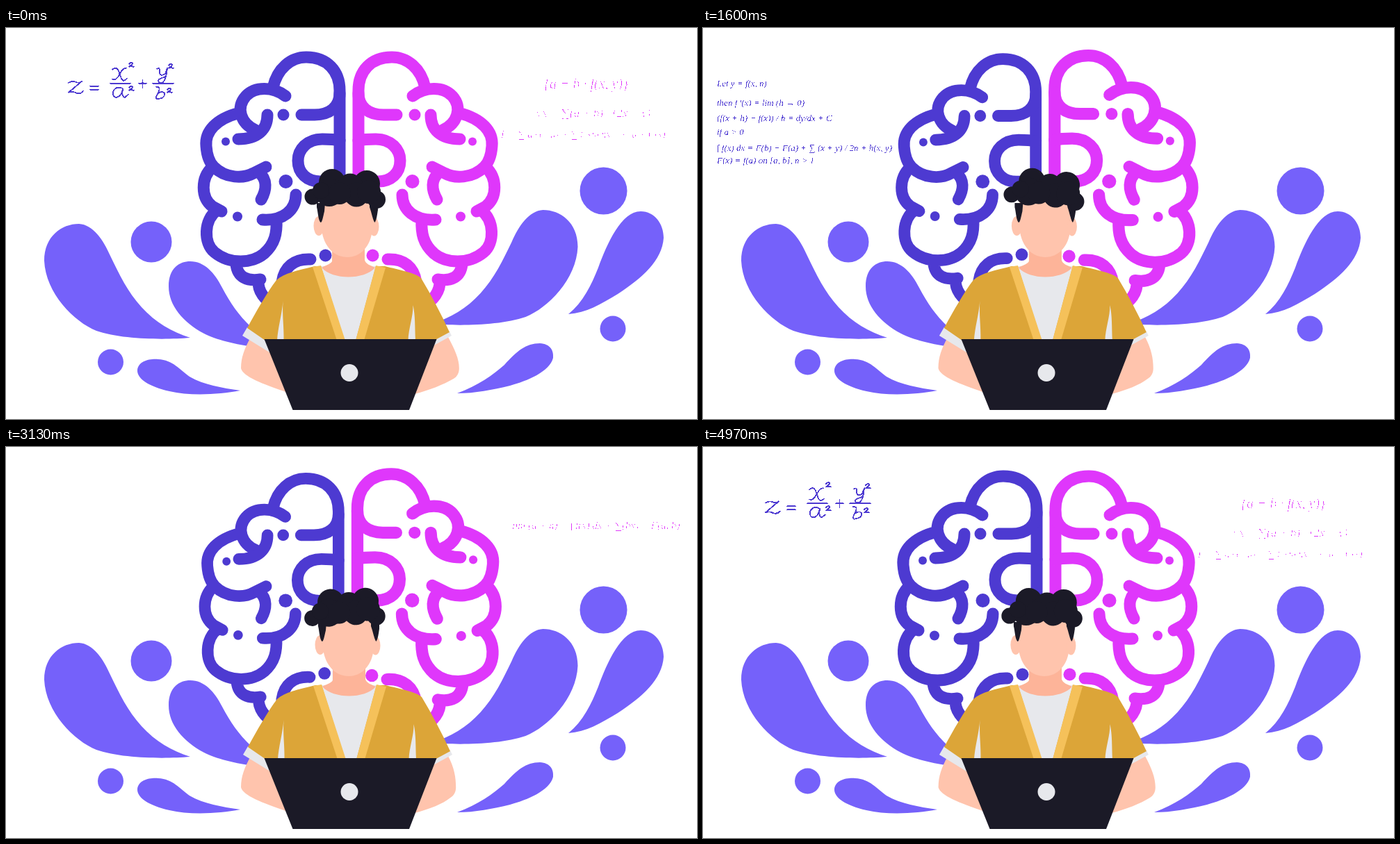
Recreate the animation shown at these times as an HTML page with a canvas. Size 994x563 px, loop 5010 ms.

```html
<!DOCTYPE html>
<html lang="en">
<head>
<meta charset="utf-8">
<title>Thinking</title>
<style>
html, body { margin: 0; width: 100%; height: 100%; overflow: hidden; background: #fff; }
canvas { display: block; }
</style>
</head>
<body>
<canvas id="stage" width="994" height="563"></canvas>
<script>
const LOOP = 5010;
const BLUE = '#4d3ad1', PINK = '#df37fb', SPLASH = '#7561fa';
const SKIN = '#ffc4ad', NECK = '#fdb499', SHIRT = '#dca538', LAPEL = '#f5c15a';
const TEE = '#e7e8ec', DARK = '#1b1a27';

const ctx = document.getElementById('stage').getContext('2d');
const layer = document.createElement('canvas');
layer.width = 994;
layer.height = 250;
const ink = layer.getContext('2d', { willReadFrequently: true });

function fill(color, ...paths) {
  ctx.fillStyle = color;
  for (const p of paths) ctx.fill(new Path2D(p));
}

function disc(x, y, r) {
  ctx.beginPath();
  ctx.arc(x, y, r, 0, Math.PI * 2);
  ctx.fill();
}

function ellipse(x, y, rx, ry) {
  ctx.beginPath();
  ctx.ellipse(x, y, rx, ry, 0, 0, Math.PI * 2);
  ctx.fill();
}

function mirrored(x, y, draw) {
  ctx.save();
  ctx.translate(x, y);
  ctx.scale(-1, 1);
  draw();
  ctx.restore();
}

// Smooth periodic curve through one value per pose time
const POSES = [0, 430, 1130, 2070, 3130, 3870];
function sway(t, values) {
  const n = POSES.length;
  const time = i => POSES[(i + n) % n] + LOOP * Math.floor(i / n);
  const val = i => values[(i + n) % n];
  const slope = i => (val(i + 1) - val(i - 1)) / (time(i + 1) - time(i - 1));
  let i = n - 1;
  while (POSES[i] > t) i--;
  const d = time(i + 1) - time(i), u = (t - time(i)) / d, w = 1 - u;
  return val(i) * w * w * (1 + 2 * u) + val(i + 1) * u * u * (3 - 2 * u)
    + slope(i) * d * u * w * w - slope(i + 1) * d * u * u * w;
}

/* ---------- brain ---------- */
const rim = new Path2D([
  'M384 86C390 58 410 42 432 42C462 42 480 62 480 90V400',
  'M402 98C384 84 358 84 345 98C330 115 338 138 359 147',
  'M336 122C302 131 286 149 288 170C289 184 293 194 299 200C316 217 342 217 356 209C366 204 372 201 374 200',
  'M297 200C280 216 280 244 297 257L310 264',
  'M304 262C284 276 284 310 300 323C322 341 354 339 371 325C387 311 390 295 389 276',
  'M331 340C333 359 347 365 366 362M363 363C362 380 372 391 388 402'
].join(''));
const folds = new Path2D([
  'M480 94C480 114 465 125 444 125H425',
  'M376 125C376 146 362 160 334 160',
  'M480 162C471 160 464 160 455 160C433 160 420 175 420 191C420 209 433 221 452 221H470',
  'M364 208C376 218 375 233 367 247',
  'M369 276C399 278 417 262 417 240',
  'M438 333C415 332 400 344 397 366'
].join(''));

function hemisphere(color, scale) {
  ctx.save();
  ctx.translate(383, 235);
  ctx.scale(scale, scale);
  ctx.translate(-383, -235);
  ctx.strokeStyle = ctx.fillStyle = color;
  ctx.lineWidth = 17;
  ctx.lineCap = ctx.lineJoin = 'round';
  ctx.stroke(rim);
  ctx.stroke(folds);
  disc(399, 125, 8.5);
  disc(316, 163.5, 6);
  disc(402.5, 221, 10);
  disc(333, 271.5, 7);
  disc(459.5, 327.5, 9);
  ctx.restore();
}

function brain(t) {
  const k = (1 - Math.cos((t - 50) / LOOP * Math.PI * 2)) / 2;
  hemisphere(BLUE, 1 - 0.02 * k);
  mirrored(987, 0, () => hemisphere(PINK, 1 + 0.018 * k));
}

/* ---------- splashes ---------- */
function bigDrop() {
  fill(SPLASH, 'M55 335C55 300 80 282 105 282C125 283 140 305 150 328C163 355 175 380 195 402C215 424 238 437 265 446C230 449 168 449 130 436C98 423 57 382 55 335Z');
}

function splashes() {
  bigDrop();
  mirrored(877.5, -20, bigDrop);
  fill(SPLASH,
    'M234 372C234 345 250 336 265 336C285 336 300 352 311 374C322 395 335 414 352 430L362 460C330 456 300 448 285 440C255 424 234 400 234 372Z',
    'M189 492C191 480 205 476 219 477C240 478 250 492 264 502C285 514 310 518 337 522C305 528 265 530 235 523C205 516 188 505 189 492Z',
    'M809 412C830 395 842 370 852 345C865 310 885 264 913 264C933 264 946 282 946 302C944 335 915 360 880 383C855 398 835 410 809 412Z',
    'M649 526C680 514 700 500 717 485C735 465 748 454 768 454C783 455 788 464 787 475C782 495 750 508 725 515C700 521 675 526 649 526Z');
  disc(209, 308, 29.5);
  disc(150.5, 481, 18.5);
  disc(859.5, 234.5, 34);
  disc(873, 433, 18.5);
}

/* ---------- formulas ---------- */
const two = (x, y) => `M${x} ${y + 2}q1-2 3-2q4 0 1 3l-4 3q3-1 7 0`;
const fraction = new Path2D([
  'M90 79Q96 76 100 78Q106 80 109 77L90 93Q97 91 101 94Q107 96 111 91',
  'M121 84H133M121 89H133',
  'M153 60Q159 55 162 62L166 73Q169 79 174 73M173 58Q168 58 164 66Q158 77 153 74',
  'M150 80H179M211 80H241M191 80H202M196.5 75V86',
  'M167 87Q158 83 154 92Q153 101 160 100Q166 98 168 88Q166 100 171 100L176 96',
  'M217 59Q222 56 221 64Q222 71 229 66L232 58Q230 78 224 79Q217 79 220 74L230 70',
  'M216 85Q224 84 218 95Q213 104 220 102Q229 101 228 94Q224 90 218 95',
  two(177, 50), two(177, 84), two(234, 52), two(232, 87)
].join(''));

function write(size, rows) {
  ink.font = `italic ${size}px "Liberation Serif", serif`;
  for (const [text, x, y] of rows) ink.fillText(text, x, y);
}

// keys: time, opacity, vertical shift
const formulas = [
  { color: BLUE,
    keys: [[3800, 0, 45], [4700, 1, 11], [5060, 1, -2], [5440, 0.57, -16], [5910, 0, -33]],
    draw() {
      ink.lineWidth = 1.8;
      ink.stroke(fraction);
    } },
  { color: BLUE,
    keys: [[650, 0, 29], [1130, 0.6, 0], [1500, 1, -22], [2070, 0.53, -58], [2720, 0, -96]],
    draw() {
      write(13, [
        ['Let y = f(x, n)', 20, 112],
        ["then f '(x) = lim (h → 0)", 20, 140],
        ['(f(x + h) − f(x)) / h = dy/dx + C', 20, 162],
        ['if a > 0', 20, 182],
        ['∫ f(x) dx = F(b) − F(a) + ∑ (x + y) / 2n + h(x, y)', 20, 205],
        ['F(x) = f(a) on [a, b], n > 1', 20, 223]
      ]);
    } },
  { color: PINK,
    keys: [[4300, 0.45, 25], [5010, 0.54, 0], [5440, 0.6, -19], [5700, 0.75, -26], [6140, 0.45, -36]],
    draw() {
      write(20, [['{a + b · f(x, y)}', 774, 87]]);
      write(17, [['√x = ∑(a + b) / (2x − y)', 762, 128]]);
      write(14, [['E = ∑ a cos nx + ∑ b sin nx + ½ a + C(x)', 712, 158]]);
    } },
  { color: PINK,
    keys: [[2500, 0.4, 25], [3130, 0.56, 0], [3400, 0.8, -11], [3800, 0.4, -27]],
    draw() {
      write(15, [['lim (a + n) = ∫ f(x) dx + ∑(bx) − F(a, b)', 728, 118]]);
    } }
];

function formulaLayer(t) {
  ink.clearRect(0, 0, layer.width, layer.height);
  for (const f of formulas) {
    const k = f.keys;
    const now = t < k[0][0] ? t + LOOP : t;
    const i = k.findIndex(key => key[0] > now);
    if (i < 1) continue;
    const [t0, a0, y0] = k[i - 1], [t1, a1, y1] = k[i];
    const u = (now - t0) / (t1 - t0);
    ink.save();
    ink.globalAlpha = a0 + (a1 - a0) * u;
    ink.translate(0, y0 + (y1 - y0) * u);
    ink.fillStyle = ink.strokeStyle = f.color;
    ink.lineCap = ink.lineJoin = 'round';
    f.draw();
    ink.restore();
  }
  // Hard alpha cut: thin strokes crumble as they fade
  const img = ink.getImageData(0, 0, layer.width, layer.height);
  const d = img.data;
  for (let i = 3; i < d.length; i += 4) d[i] = d[i] > 127 ? 255 : 0;
  ink.putImageData(img, 0, 0);
  ctx.drawImage(layer, 0, 0);
}

/* ---------- person ---------- */
function arms(t) {
  const beat = n => Math.cos(t / LOOP * n * Math.PI * 2);
  const l = 340 - 2 * beat(16), r = 649.5 + 2.3 * beat(20);
  fill(SKIN,
    `M352 445C343 462 ${l} 474 ${l} 490C${l + 3} 502 368 512 405 525L420 450Z`,
    `M636 445C645 462 ${r} 476 ${r} 490C${r} 497 ${r - 3} 502 ${r - 8} 505C628 514 610 521 588 527L570 450Z`);
}

function torso() {
  fill(TEE,
    'M347 431L340 443L379 467L376 447Z',
    'M638 437L641 443L610 460L614 446Z');
  fill(SHIRT, 'M444 343C420 349 400 353 389 363C376 380 360 408 347 432L376 452H612L638 438C626 412 612 385 597 360C590 353 565 348 545 343Z');
  fill(TEE,
    'M398.5 393C397 412 391 432 390 450H399.5C400 430 397 412 398.5 393Z',
    'M585.5 399C586 415 579 432 578.5 450H589C588 430 589 415 585.5 399Z',
    'M453 343L532 343L503 450H487Z');
  fill(LAPEL,
    'M441 344L453 342L488 450H476Z',
    'M546 345L532 342L503 450H515Z');
  fill(NECK, 'M469 312V336C466 341 458 342 454 345C470 363 515 363 531 345C525 342 517 340 516 334V312Z');
}

function head() {
  fill(SKIN, 'M454 250V290C457 316 473 330 491 330C510 330 525 314 527 290V250Z');
  ellipse(450, 285, 7.5, 14);
  ellipse(529.5, 286, 7, 13.5);
  fill(DARK,
    'M447 252H459L458 264C456 272 455 280 452.5 280C449 276 449 266 447 258Z',
    'M523 252H535V262C534 268 533 277 530.5 280C528 278 526 266 523 258Z');
}

function hair() {
  ctx.fillStyle = DARK;
  const curls = [[469, 222, 19], [519, 224, 19], [495, 228, 18.5], [441, 243, 11.5],
    [533, 247, 13], [465, 237, 20], [504, 240, 17.5], [480, 238, 16], [522, 236, 17], [453, 234, 12]];
  for (const c of curls) disc(...c);
}

function person(t) {
  arms(t);
  ctx.save();
  ctx.translate(sway(t, [0, 1, 1, -1, 1, -0.5]), 0);
  torso();
  ctx.restore();

  ctx.save();
  ctx.translate(sway(t, [0, 2, 3.5, -0.5, 2, -2]), 0);
  head();
  ctx.restore();

  ctx.save();
  ctx.translate(488 + sway(t, [0, 3.5, 5.5, 0.3, -0.7, -3.5]), 240);
  ctx.rotate(sway(t, [0, 1.1, 3.8, 2.7, -4.2, -4.2]) * Math.PI / 180);
  ctx.translate(-488, -240);
  hair();
  ctx.restore();

  fill(DARK, 'M371.5 448H619.5L580 550H412.5Z');
  ctx.fillStyle = TEE;
  disc(494, 496.5, 12.5);
}

const start = performance.now();
function frame() {
  const t = (performance.now() - start) % LOOP;
  ctx.fillStyle = '#fff';
  ctx.fillRect(0, 0, 994, 563);
  brain(t);
  splashes();
  formulaLayer(t);
  person(t);
  requestAnimationFrame(frame);
}
frame();
</script>
</body>
</html>
```
